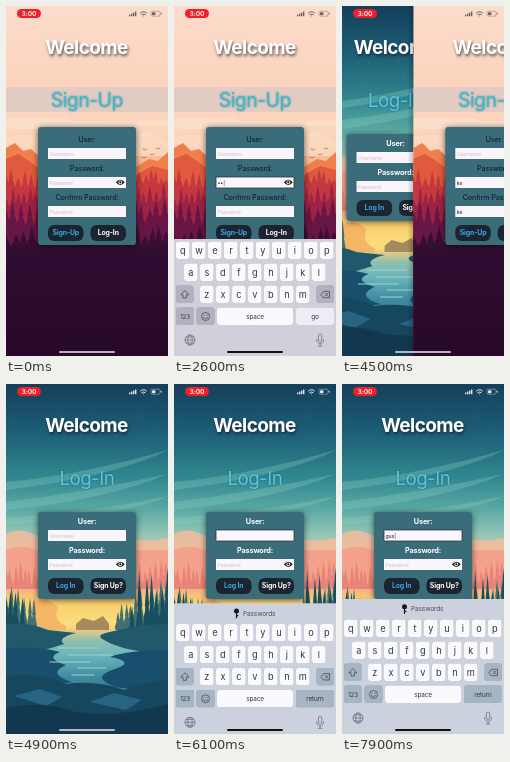
An HTML page for the animation above (8 s loop, 162 px wide and 350 px high).

```html
<!DOCTYPE html>
<html lang="en">
<head>
<meta charset="utf-8">
<title>Sign-up and log-in</title>
<style>
html, body { margin: 0; width: 100%; height: 100%; overflow: hidden; background: #2b0a2e; }
svg { display: block; width: 100vw; height: 100vh; }
text { font-family: Inter, Roboto, sans-serif; letter-spacing: -.02em; white-space: pre; }
.mid { text-anchor: middle; }
.bold { font-weight: 700; }
.welcome { letter-spacing: -.03em; filter: drop-shadow(1px 2px 1.5px rgba(20, 20, 30, .7)); }
.title { letter-spacing: -.03em; filter: drop-shadow(.7px .9px .8px rgba(10, 75, 95, .55)); }
.panel { filter: drop-shadow(0 1px 3px rgba(0, 0, 0, .6)); }
.key { filter: drop-shadow(0 .6px 0 rgba(90, 95, 110, .5)); }
</style>
</head>
<body>
<svg id="stage" viewBox="0 0 162 350" preserveAspectRatio="none"></svg>
<script>
const stage = document.getElementById('stage');
const $ = id => document.getElementById(id);

const rect = (x, y, w, h, fill, r = 0, extra = '') =>
  `<rect x="${x}" y="${y}" width="${w}" height="${h}" rx="${r}" fill="${fill}" ${extra}/>`;
const path = (d, fill, extra = '') => `<path d="${d}" fill="${fill}" ${extra}/>`;
const line = (d, color, w) =>
  path(d, 'none', `stroke="${color}" stroke-width="${w}" stroke-linecap="round" stroke-linejoin="round"`);
const label = (s, x, y, size, fill, cls = 'mid') =>
  `<text x="${x}" y="${(y + size * .36).toFixed(2)}" font-size="${size}" fill="${fill}" class="${cls}">${s}</text>`;
const gradient = (id, stops) =>
  `<linearGradient id="${id}" x2="0" y2="1">${stops.map(([o, c]) =>
    `<stop offset="${o}" stop-color="${c}"/>`).join('')}</linearGradient>`;

function seeded(seed) {
  return () => (seed = (seed * 16807) % 2147483647) / 2147483647;
}

// A row of pines standing on the line base(x), down to the given floor.
function pines(seed, x0, x1, step, base, height, floor) {
  const rnd = seeded(seed);
  let d = `M${x0} ${floor}`;
  for (let x = x0; x < x1; x += step * (.7 + .6 * rnd())) {
    const y = base(x), h = height * (.45 + .55 * rnd()), w = step * .62;
    d += `L${x - w} ${y}L${x - w * .4} ${y - h * .4}L${x - w * .6} ${y - h * .4}` +
         `L${x} ${y - h}L${x + w * .6} ${y - h * .4}L${x + w * .4} ${y - h * .4}L${x + w} ${y}`;
  }
  return d + `L${x1} ${floor}Z`;
}

function forestScene() {
  return rect(0, 0, 162, 350, 'url(#peach)') +
    path('M0 112H58L70 115H162V120H96L84 123H0Z', '#fde6d4', 'opacity=".5"') +
    path('M0 131Q24 126 44 133T96 130T162 134V150H0Z', '#fde2cb', 'opacity=".6"') +
    line('M137 143l2 1 2-1M144 148l2 1 2-1M150 142l2 1 2-1M136 151l2 1 2-1', '#8b5553', .6) +
    path('M0 142L9 137L17 145L25 143L36 153L60 162L92 165L116 158L130 161L143 153L152 155L162 146V210H0Z', '#f07f4e') +
    path('M0 153L12 148L23 155L34 163L80 172L128 170L146 160L162 164V215H0Z', '#e05a3e') +
    path(pines(17, 0, 162, 6, x => 179 + 4 * Math.sin(x / 23), 19, 350), '#c4383f') +
    path(pines(29, 0, 162, 6, x => 197 + 4 * Math.cos(x / 19), 20, 350), '#9c2344') +
    path(pines(41, 0, 162, 7, x => 215 + 4 * Math.sin(x / 15), 22, 350), '#681645') +
    path(pines(53, 0, 162, 8, x => 236 + 4 * Math.cos(x / 21), 24, 350), 'url(#dusk)');
}

function lakeScene() {
  const rnd = seeded(7);
  let stars = '';
  for (let i = 0; i < 26; i++)
    stars += `<circle cx="${rnd() * 162}" cy="${14 + rnd() * 80}" r="${.2 + rnd() * .3}"/>`;
  return rect(0, 0, 162, 350, 'url(#evening)') +
    `<g fill="#d3ecec" opacity=".5">${stars}</g>` +
    path('M0 98Q70 92 162 66Q110 92 0 106ZM0 118Q80 108 162 90Q100 116 0 126ZM0 134Q90 128 162 112Q120 132 0 141Z',
      '#8fd0c2', 'opacity=".3"') +
    path('M0 150Q12 143 24 149T46 152H120Q136 160 162 154V200H0Z', '#f0bd9f', 'opacity=".9"') +
    path('M0 166Q16 159 34 167T92 170T162 166V222H0Z', '#f5a28c') +
    path(pines(61, 0, 40, 5, x => 198 + x * .2, 26, 225), '#e98578') +
    path(pines(67, 122, 162, 5, x => 204 - (x - 122) * .2, 26, 225), '#e98578') +
    rect(0, 205, 162, 50, 'url(#glow)') +
    path('M26 250V218Q42 212 52 224Q46 236 60 242V250Z', '#f3a95f', 'opacity=".7"') +
    path('M70 248V240L77 234L88 237L97 232L103 240V248Z', '#a58a5d') +
    path(pines(13, 0, 28, 5, x => 226 + x * .6, 30, 256), '#40706f') +
    path(pines(23, 112, 162, 5, x => 243 - (x - 112) * .4, 34, 256), '#40706f') +
    path(pines(31, 0, 20, 6, x => 236 + x * .6, 46, 262), '#174e60') +
    path(pines(37, 126, 162, 6, x => 248 - (x - 126) * .4, 58, 262), '#174e60') +
    rect(0, 246, 162, 104, 'url(#water)') +
    path('M0 240Q22 238 42 246L70 249Q50 254 58 260Q30 270 0 271Z', '#205a6a') +
    path('M162 240Q136 240 104 248Q88 251 98 256Q118 268 162 270Z', '#205a6a') +
    path('M0 264Q34 262 54 268Q38 274 60 281Q40 290 66 298Q30 306 0 304Z', '#184f6c') +
    path('M162 266Q122 266 104 273Q132 278 106 286Q84 294 110 303Q140 308 162 304Z', '#184f6c') +
    line('M52 264H92M62 271H106M44 278H84M72 284H100M66 291H88', '#a0d4cb', 1) +
    path('M0 292Q36 288 60 300Q92 296 118 306Q140 298 162 296V350H0Z', '#17465f') +
    path('M8 312L34 305L56 313L40 322ZM84 318L108 309L136 316L120 326Z', '#266482') +
    path('M0 324Q36 316 70 328Q112 334 162 320V350H0Z', '#123850');
}

const eye = (y, id) => `<g transform="translate(114.3 ${y})">` +
  path('M-4.4 0Q0-5.2 4.4 0Q0 5.2-4.4 0Z', '#111') +
  `<circle r="1.9" fill="#fff"/><circle r="1.1" fill="#111"/>` +
  `<g id="${id}" visibility="hidden">${line('M-3.6-3.5L3.8 3.5', '#fff', 1.6)}` +
  `${line('M-4.1-3.2L3.4 3.9', '#111', 1)}</g></g>`;

const field = (id, y) =>
  rect(42, y - 5.5, 78, 11, '#fbf6fc', .6, `id="${id}Box" stroke="#263840"`) +
  `<text id="${id}" x="43.5" y="${y + 2}" font-size="5.2"></text>`;

const button = (s, x, y, color) =>
  rect(x, y - 8, 35.5, 16, '#1b2430', 6) + label(s, x + 17.75, y, 6.9, color, 'mid bold');

const panel = (y, h) => rect(32, y, 98, h, '#3a6c79', 3, 'class="panel"');

const heading = (title, size, color) =>
  label('Welcome', 80.5, 41, 19, '#fff', 'mid bold welcome') +
  label(title, 80.8, 94, size, color, 'mid title');

function signUpPage() {
  return forestScene() + rect(0, 81, 162, 25, '#c9c5ca', 0, 'opacity=".5"') +
    heading('Sign-Up', 19.5, '#38bdd2') + panel(121, 118) +
    label('User:', 81, 133, 7.3, '#10191d') + field('newUser', 147.5) +
    label('Password:', 81, 162, 7.3, '#10191d') + field('newPass', 176.5) + eye(176.3, 'slash') +
    label('Confirm Password:', 81, 191, 7.3, '#10191d') + field('confirm', 205.5) +
    button('Sign-Up', 42, 227, '#38a9e4') + button('Log-In', 84.5, 227, '#fff');
}

function logInPage() {
  return lakeScene() + heading('Log-In', 18.8, '#5cc6df') + panel(128, 87) +
    label('User:', 81, 137, 7.3, '#fff', 'mid bold') + field('user', 151.5) +
    label('Password:', 81, 166, 7.3, '#fff', 'mid bold') + field('pass', 180.5) + eye(180.3, 'slash2') +
    button('Log In', 42, 202, '#38a9e4') + button('Sign Up?', 84.5, 202, '#fff');
}

function keyboard(id, bg, dark, action, actionFill, bar) {
  const key = (s, x, y, w, fill, size) =>
    rect(x, y - 8.7, w, 17.4, fill, 2.4, 'class="key"') + label(s, x + w / 2, y, size, '#33363d');
  let out = rect(0, bar ? 215 : 233, 162, 140, bg);
  if (bar) {
    out += `<circle cx="62.5" cy="222.8" r="2.5" fill="#17191c"/>` +
      line('M62.5 225V229.5M62.5 227.4h1.4', '#17191c', 1.2) +
      label('Passwords', 69, 225, 6.5, '#4a4f57', '');
  }
  ['qwertyuiop', 'asdfghjkl', 'zxcvbnm'].forEach((row, r) => {
    const start = [2, 10, 26][r];
    [...row].forEach((c, i) => out += key(c, start + i * 16, 244.3 + r * 22, 13.6, '#fafafc', 9.2));
  });
  out += key('', 2, 288.3, 17.5, dark, 6) + key('', 142.5, 288.3, 17.5, dark, 6) +
    key('123', 2, 310.3, 18, dark, 6.2) + key('', 22.5, 310.3, 18, dark, 6) +
    key('space', 43, 310.3, 76, '#fafafc', 6.4) + key(action, 122, 310.3, 38, actionFill, 6.4);
  const ink = '#4a4f58', pale = '#6d727c';
  return `<g id="${id}">${out}` +
    line('M10.7 284.8L6.8 288.8H9V292H12.4V288.8H14.6Z', ink, .8) +
    line('M147 288.5L149.6 285.3H155.5V291.7H149.6ZM151.2 287.1L153.9 289.9M153.9 287.1L151.2 289.9', ink, .8) +
    `<circle cx="31.5" cy="310.5" r="4" fill="none" stroke="${ink}" stroke-width=".8"/>` +
    line('M30 309.2v.2M33 309.2v.2M29.3 311.7Q31.5 314.2 33.7 311.7', ink, .8) +
    `<g fill="none" stroke="${pale}" stroke-width=".8"><circle cx="16" cy="334" r="5"/>` +
    `<ellipse cx="16" cy="334" rx="2.2" ry="5"/><path d="M11 334H21M12 331H20M12 337H20"/></g>` +
    rect(144.4, 328, 3.4, 7.4, 'none', 1.7, `stroke="${pale}" stroke-width=".8"`) +
    line('M142.6 333.5Q142.6 337.4 146.1 337.4T149.6 333.5M146.1 337.4V340M144.4 340h3.4', pale, .8) + '</g>';
}

function statusBar() {
  const bars = [0, 1, 2, 3].map(i => rect(123 + i * 2, 8.4 - i, 1.4, 1.8 + i, 'currentColor', .3)).join('');
  return rect(11, 3, 24, 9, '#eb2029', 4.5) + label('3:00', 23, 7.5, 6.6, '#fbe3e0', 'mid bold') +
    `<g id="status">${bars}` +
    line('M134.4 7Q137.5 4.2 140.6 7M135.8 8.6Q137.5 7.1 139.2 8.6M137.5 9.9v.1', 'currentColor', 1) +
    rect(145, 5.2, 9, 5, 'none', 1.4, 'stroke="currentColor" stroke-width=".6" opacity=".7"') +
    rect(146, 6.2, 3.4, 3, 'currentColor', .6) + rect(154.8, 6.8, .9, 1.8, 'currentColor', .4) + '</g>';
}

stage.innerHTML = '<defs>' +
  gradient('peach', [[0, '#fcdccb'], [.25, '#fbd2bc'], [.36, '#fad6bd'], [.46, '#f6b58c'], [1, '#f6b58c']]) +
  gradient('dusk', [[0, '#46113a'], [.3, '#2f0c31'], [1, '#280928']]) +
  gradient('evening', [[0, '#153f5a'], [.14, '#1d5f77'], [.27, '#328890'], [.36, '#5caaa5'], [.43, '#93c6b5'], [.5, '#f0c09f'], [1, '#f0c09f']]) +
  gradient('glow', [[0, '#f6b184'], [.25, '#fbd06f'], [.7, '#fbdc7c'], [1, '#e9bd72']]) +
  gradient('water', [[0, '#e6cb83'], [.1, '#8fc0b0'], [.25, '#69b4bb'], [.45, '#3f8ba0'], [1, '#1a4c66']]) +
  `<linearGradient id="edge"><stop offset="0" stop-opacity="0"/><stop offset="1" stop-opacity=".22"/></linearGradient></defs>` +
  `<g id="logIn">${logInPage()}</g>` +
  `<svg id="signUp" width="168" height="350" viewBox="-6 0 168 350">${rect(-6, 0, 6, 350, 'url(#edge)')}` +
  `<svg width="162" height="350">${signUpPage()}</svg></svg>` +
  keyboard('keysA', '#d2cfda', '#b3b0bf', 'go', '#eeedf3', false) +
  keyboard('keysB', '#cbd2de', '#a6b5c4', 'return', '#a6b5c4', true) +
  statusBar() + rect(53, 345, 56, 2, '#fff', 1, 'id="home"');

const clamp = v => Math.max(0, Math.min(1, v));
const easeOut = (t, from, ms, power) => 1 - Math.pow(1 - clamp((t - from) / ms), power);

// Latest value of a [time, value] list.
const at = (t, steps) => steps.reduce((v, [s, next]) => t >= s ? next : v, '');

function setField(id, value, hint, focused) {
  const el = $(id);
  el.textContent = value ? value + (focused ? '|' : '') : focused ? '' : hint;
  el.setAttribute('fill', value ? '#1a1c20' : '#cfbcc6');
  $(id + 'Box').setAttribute('stroke-width', focused ? .8 : 0);
}

const shift = (id, x, y) => $(id).setAttribute('transform', `translate(${x.toFixed(2)} ${y.toFixed(2)})`);

function draw(t) {
  const slide = easeOut(t, 4300, 600, 1.43);
  $('signUp').setAttribute('x', (162 * slide - 6).toFixed(2));
  $('signUp').setAttribute('visibility', slide < 1 ? 'visible' : 'hidden');
  shift('logIn', -49 * (1 - slide), 0);

  const upA = easeOut(t, 1800, 400, 2.5) - easeOut(t, 3700, 400, 2.5);
  const upB = easeOut(t, 5800, 400, 2.5);
  shift('keysA', 0, 120 * (1 - upA));
  shift('keysB', 0, 138 * (1 - upB));

  setField('newUser', '', 'Username', false);
  setField('newPass', at(t, [[2400, '•'], [2600, '••'], [2800, 'ke']]), 'Password', t >= 1700 && t < 3000);
  setField('confirm', at(t, [[3200, 'k'], [3400, 'ke']]), 'Password', t >= 3000 && t < 3700);
  $('slash').setAttribute('visibility', t >= 2800 && slide < 1 ? 'inherit' : 'hidden');
  setField('user', at(t, [[6400, 'h'], [6600, 'hu'], [6800, 'hus'], [7000, 'hu'], [7100, 'h'],
    [7200, ''], [7400, 'g'], [7600, 'gu'], [7800, 'gus']]), 'Username', t >= 5800);
  setField('pass', '', 'Password', false);
  $('status').setAttribute('color', slide < 1 ? '#6e6664' : '#dbe6ea');
  $('home').setAttribute('fill', upA > .2 || upB > .2 ? '#111' : '#b9b4be');
}

const start = performance.now();
function tick() {
  draw(Math.floor((performance.now() - start) % 8000 / 100) * 100);
  requestAnimationFrame(tick);
}
tick();
</script>
</body>
</html>
```
